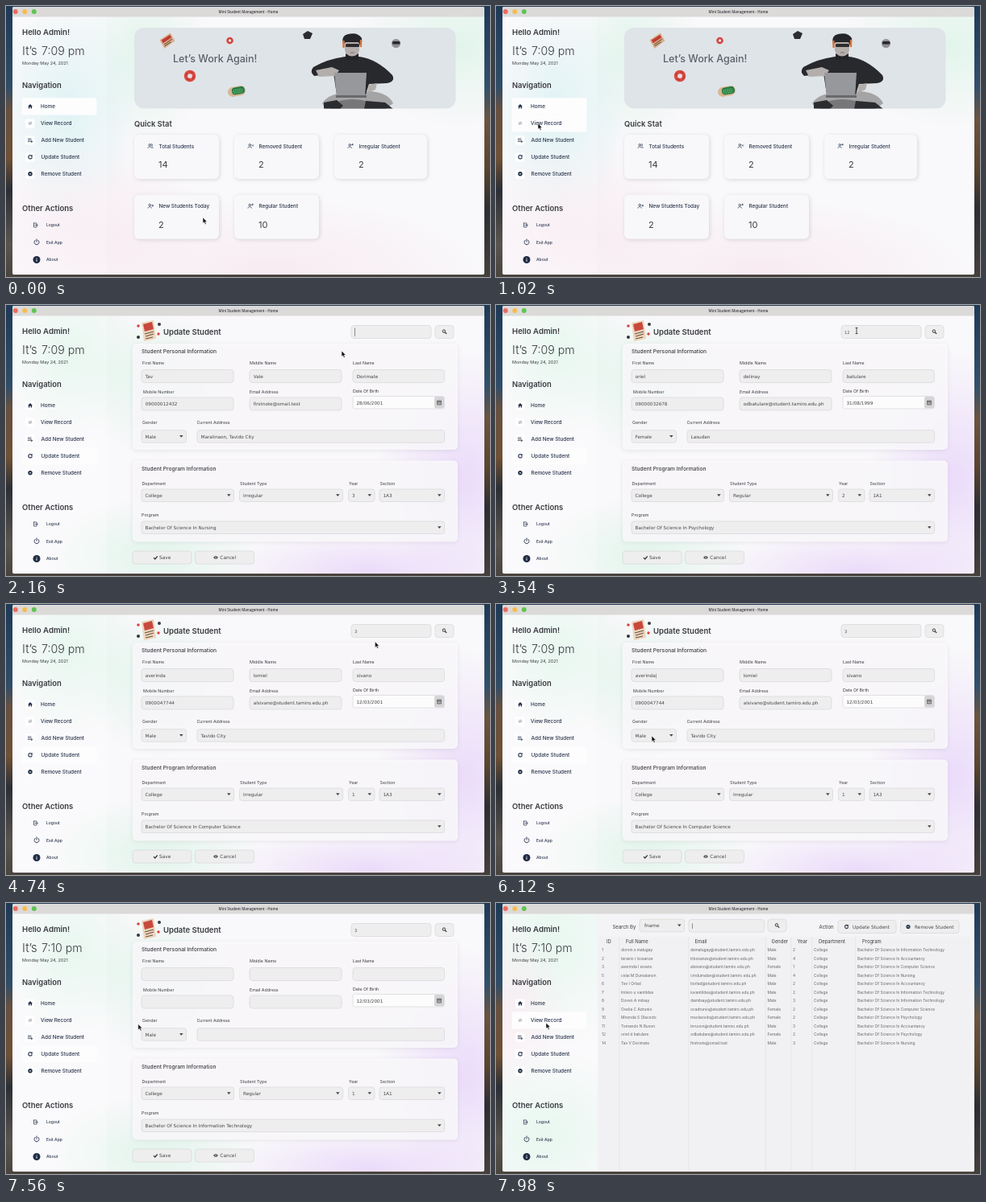
An HTML page that plays this animation: 600x337 px, repeating every 8000 ms.

```html
<!DOCTYPE html>
<html lang="en">
<head>
<meta charset="utf-8">
<title>Mini Student Management</title>
<style>
html,body{margin:0;width:100%;height:100%;overflow:hidden;background:#18202c}
svg{display:block;width:100%;height:100%}
text{font-family:Inter,sans-serif;fill:#3a3b41;white-space:pre}
.ui{font-family:"DejaVu Sans",sans-serif;fill:#46464a}
.head{font-weight:600}
.nav{font-weight:500;fill:#2a354c}
.field{fill:#efeeef;stroke:#d2d1d4;stroke-width:.6}
.lit{fill:#fcfcfc}
.panel{fill:#fbfafc;fill-opacity:.86;filter:drop-shadow(0 1.5px 2.5px #3432441c)}
.card{fill:#f8f8fa;filter:drop-shadow(1px 1.5px 2.5px #3432442a)}
.ico{fill:#1f2c45}
.line{fill:none;stroke:#26334b;stroke-width:.8;stroke-linecap:round}
.cell{fill:#66656b}
</style>
</head>
<body>
<script>
const LOOP = 8000;

const text = (x, y, s, size, cls = '', extra = '') =>
  `<text x="${x}" y="${y}" font-size="${size}" class="${cls}" ${extra}>${s}</text>`;
const box = (x, y, w, h, r, cls = '', extra = '') =>
  `<rect x="${x}" y="${y}" width="${w}" height="${h}" rx="${r}" class="${cls}" ${extra}/>`;
const dot = (x, y, r, fill, extra = '') => `<circle cx="${x}" cy="${y}" r="${r}" fill="${fill}" ${extra}/>`;
const path = (d, extra) => `<path d="${d}" ${extra}/>`;
const at = (x, y, body, more = '') => `<g transform="translate(${x} ${y}) ${more}">${body}</g>`;
const group = (id, body) => `<g id="${id}">${body}</g>`;
const gradient = (id, stops, dir = 'x2="0" y2="1"') => `<linearGradient id="${id}" ${dir}>` +
  stops.map(([o, c]) => `<stop offset="${o}" stop-color="${c}"/>`).join('') + '</linearGradient>';
const glow = (id, color, opacity) => `<radialGradient id="${id}">
  <stop stop-color="${color}" stop-opacity="${opacity}"/><stop offset="1" stop-color="${color}" stop-opacity="0"/></radialGradient>`;
const blob = (x, y, rx, ry, id) => `<ellipse cx="${x}" cy="${y}" rx="${rx}" ry="${ry}" fill="url(#${id})"/>`;

const defs = `<defs>
  ${gradient('leftEdge', [[0, '#1e3a56'], [.3, '#304d68'], [.38, '#665040'], [.56, '#6f5135'], [.68, '#2b2f36'], [.88, '#5a544e'], [1, '#4a443f']])}
  ${gradient('rightEdge', [[0, '#1e3a56'], [.3, '#33506a'], [.42, '#6b543f'], [.6, '#59442f'], [.75, '#2c2e33'], [1, '#45403c']])}
  ${glow('mint', '#d2f3e2', .6)}${glow('cyan', '#d3eef0', .85)}${glow('pink', '#f7e2ec', .6)}${glow('lilac', '#e6d2fa', .75)}
  <pattern id="hatch" width="1.4" height="1.4" patternUnits="userSpaceOnUse">
    <rect width="1.4" height="1.4" fill="#d6e6f0"/><rect width=".7" height=".7" fill="#6ca3c8"/><rect x=".7" y=".7" width=".7" height=".7" fill="#8bb8d4"/>
  </pattern>
  <clipPath id="window"><rect x="8" y="1" width="585" height="333" rx="2"/></clipPath>
  <clipPath id="hero"><rect x="159" y="27" width="398.5" height="100.5" rx="12"/></clipPath>
</defs>`;

// Icons are centred on the origin.
const magnifier = at(0, 0, `<circle cx="-.6" cy="-.6" r="1.7" fill="none" stroke="#333" stroke-width="1"/>` +
  path('M.8.8 2.7 2.7', 'stroke="#333" stroke-width="1.2"'));
const refresh = path('M2-1.7A2.5 2.5 0 1 0 2.4 1', 'class="line" style="stroke-width:1.3"') + path('M3-3V-.2H.3Z', 'class="ico"');
const remove = dot(0, 0, 3, '#1f2c45') + path('M-1-1 1 1M1-1-1 1', 'stroke="#fff" stroke-width=".8"');
const navIcons = [
  path('M-3.2.2 0-3 3.2.2H2.3V3H.8V.8H-.8V3H-2.3V.2Z', 'class="ico"'),
  path('M-2-.9H2L.9-2M2 .9H-2L-.9 2', 'class="line" style="stroke:#77808f;stroke-width:.7"'),
  path('M-3-2H1.2M-3 0H1.2M-3 2H-.6M.6 2H3.2M1.9.7V3.3', 'class="line"'),
  refresh, remove
];
const person = mark => `<circle cx="-1" cy="-1.4" r="1.5" class="line"/>` +
  path('M-3.7 3C-3.7.4 1.7.4 1.7 3' + mark, 'class="line"');
const plus = 'M2.2-.6H4.4M3.3-1.7V.5';
const cross = 'M2.4-1.5 4.2.3M4.2-1.5 2.4.3';
const pair = 'M1.6-2.9A1.5 1.5 0 0 1 1.6.1M2.6 1Q3.8 1.6 3.8 3';
const star = 'M3-3V-1M2-2H4';

const gadget = path('M-8-3 7-8 10 3-5 9Z', 'fill="#d7b08b"') + path('M-6-2 6-6 7-2-5 2Z', 'fill="#c33b30"') +
  path('M-4 4 7 0M-4 6 5 3', 'stroke="#6d4939" stroke-width="1"');
const ring = dot(0, 0, 4.6, 'none', 'stroke="#dc4a42" stroke-width="4"') + dot(0, 0, 4.6, 'none', 'stroke="#b9302b" stroke-width="1" stroke-dasharray="4 3"');

const figure = `
  ${path('M392 121Q400 108 424 108L452 106Q474 108 480 121L470 128H396Z', 'fill="#a5a4a5"')}
  ${path('M404 122Q430 108 470 126L472 128H402Z', 'fill="#77777a"')}
  ${path('M394 120 410 117 418 124 414 128H394ZM446 118 470 120 480 128H444Z', 'fill="#2b2c30"')}
  ${path('M420 63Q398 66 381 76 376 82 382 87L406 84 410 110H446L450 97 472 96Q483 94 479 86 460 66 438 63Z', 'fill="#28292d"')}
  ${path('M384 80 404 76 413 80 408 87 388 88Z', 'fill="#b3aeac"')}
  ${path('M450 98 460 96 458 104 448 108Z', 'fill="#b3aeac"')}
  ${path('M420 44H438V55Q436 63 429 63 422 63 420 55Z', 'fill="#b5aeab"')}
  ${path('M421 59Q429 66 437 59V67H421Z', 'fill="#222327"')}
  ${path('M418 48Q415 37 424 35 436 32 441 40 442 46 439 49L437 45H421Z', 'fill="#25262a"')}
  ${path('M418.5 44V51M440 43V50', 'stroke="#d9743c" stroke-width="2.4" stroke-linecap="round"')}
  ${box(421, 47, 17, 4, 1.5, '', 'fill="#2b2c30"')}
  ${path('M427 58H432', 'stroke="#6a6362" stroke-width=".8"')}
  ${path('M407 83H447L445 113H410Z', 'fill="#97989b"')}${path('M409 111H447V114H409Z', 'fill="#68696d"')}`;

const stats = [['Total Students', 14, pair], ['Removed Student', 2, cross], ['Irregular Student', 2, star],
  ['New Students Today', 2, plus], ['Regular Student', 10, star]];
const homePage = blob(560, 50, 130, 100, 'mint') + blob(170, 60, 80, 110, 'mint') + blob(75, 130, 90, 150, 'cyan') + blob(100, 280, 150, 110, 'pink') + blob(330, 330, 260, 90, 'pink') +
  box(159, 27, 398.5, 100.5, 12, '', 'fill="#dfe4e8"') +
  `<g clip-path="url(#hero)">${figure}</g>` +
  at(199, 43, gadget, 'rotate(-15)') + at(277.5, 43, ring, 'scale(.65)') + at(228, 87, ring, 'scale(1.1)') +
  at(286, 106, box(-11, -6, 22, 12, 6, '', 'fill="#d9b694"') + box(-6, -5, 16, 9, 4, '', 'fill="#277a42"') +
    path('M-4-2H7M-5 0H8M-4 2H7', 'stroke="#7ed28c" stroke-width=".9" stroke-dasharray="1.5 1"'), 'rotate(-10)') +
  path('M368 35 374 31 380 34 377 41 370 41Z', 'fill="#2b2d30"') +
  dot(483.5, 46.5, 5.5, '#8e9093') + box(479, 44, 9.5, 3.6, 1.5, '', 'fill="#26282b"') +
  text(207, 70, 'Let’s Work Again!', 12.5, '', 'style="fill:#5a6067;font-weight:500"') +
  text(159, 150.3, 'Quick Stat', 9.4, 'head') +
  stats.map(([label, value, mark], i) => at(159 + i % 3 * 124, 160 + (i > 2) * 74.7,
    box(0, 0, i === 2 ? 115 : 105, 55, 6, 'card') + at(20, 14, person(mark), 'scale(.85)') + text(30.5, 16.5, label, 6.35, 'nav') + text(30, 41.2, value, 11))).join('');

const combo = (id, x, y, w) => box(x, y, w, 15.5, 3, 'field') + text(x + 4.5, y + 10, '', 5.7, 'ui', `id="${id}"`) +
  path(`M${x + w - 8.5} ${y + 6.2}h4.6l-2.3 2.8Z`, 'fill="#444"');
const input = (id, x, y, w) => box(x, y, w, 16, 3.5, 'field') + text(x + 4.7, y + 10.3, '', 5.7, 'ui', `id="${id}"`);
const label = (x, y, s) => text(x, y, s, 5.3);
const button = (x, y, w, s, tx, icon, id = '') => box(x, y, w, 16, 3.5, 'field', id && `id="${id}"`) +
  icon + text(tx, y + 10.2, s, 5.85, 'ui');

const updatePage = blob(185, 310, 130, 70, 'mint') + blob(190, 100, 90, 90, 'mint') + blob(570, 215, 110, 160, 'lilac') + blob(80, 60, 90, 100, 'mint') + blob(450, 330, 180, 50, 'lilac') +
  at(176, 32, path('M-8-10 7-13 10 10-5 13Z', 'fill="#ecd6bd"') + path('M-6-8 5-11 7-2-4 1Z', 'fill="#c8493c"') +
    path('M-4 4 7 1M-3 7 7 4M-3 10 6 8', 'stroke="#6d5144" stroke-width="1.1"') + dot(-12, -6, 1.8, '#d8453e') + dot(14, -8, 2, '#3a3c40') +
    dot(-12, 8, 2, '#333539') + dot(13, 4, 1.7, '#d8453e')) +
  text(195, 37, 'Update Student', 9.5, 'head') +
  box(428, 25.5, 99, 16, 3.5, 'field') + text(432, 35.6, '', 5, 'ui', 'id="query"') +
  path('M432.5 28.5V39', 'id="caret" stroke="#444" stroke-width=".6"') +
  box(532, 25.5, 23, 16, 3.5, 'field') + at(543.5, 33.2, magnifier) +
  box(157, 48, 403, 132, 5, 'panel') + text(168, 60, 'Student Personal Information', 6.7, '', 'font-weight="500"') +
  label(169, 74, 'First Name') + label(302, 74, 'Middle Name') + label(430, 74, 'Last Name') +
  input('first', 168, 80.5, 114) + input('middle', 302, 80.5, 114) + input('last', 430, 80.5, 113.5) +
  label(170, 109.7, 'Mobile Number') + label(302, 109.7, 'Email Address') + label(430, 108.7, 'Date Of Birth') +
  input('phone', 168, 115, 114) + input('email', 302, 115, 114) +
  box(430, 113.5, 113.5, 15.5, 2.5, 'field lit') + text(434.5, 123.8, '', 5.7, 'ui', 'id="birth"') +
  box(531, 114, 12, 14.5, 2, '', 'fill="#d5d4d6"') + path('M534.5 119H539.5V124H534.5ZM534.5 120.5H539.5M536 119V124M538 119V124', 'fill="none" stroke="#555" stroke-width=".7"') +
  label(169, 148, 'Gender') + label(236.5, 148, 'Current Address') +
  combo('gender', 168, 155.7, 55.5) + box(237, 155.7, 306.5, 15.5, 3, 'field') + text(241.5, 165.7, '', 5.7, 'ui', 'id="address"') +
  box(157, 193.5, 403, 101, 5, 'panel') + text(168, 205.5, 'Student Program Information', 6.7, '', 'font-weight="500"') +
  label(168.5, 223.5, 'Department') + label(290, 223.5, 'Student Type') + label(425, 223.5, 'Year') + label(463.5, 223.5, 'Section') +
  combo('department', 168, 229, 114.5) + combo('type', 289.5, 229, 128) + combo('year', 424.5, 229, 32.5) + combo('section', 463, 229, 80.5) +
  label(168, 263, 'Program') + combo('program', 168, 269, 375.5) +
  button(157, 306, 73, 'Save', 190, path('M183 314.2 184.7 316 187.7 312.5', 'fill="none" stroke="#333" stroke-width="1.2"'), 'save') +
  button(234.5, 306, 73, 'Cancel', 265.3, at(260, 314, `<ellipse rx="2.7" ry="1.8" fill="#444"/>` + path('M-1.2 0H1.2', 'stroke="#fff" stroke-width=".8"'))) +
  group('popup', box(168, 171.5, 56, 26.5, 1.5, '', 'fill="#f7f7f7" stroke="#aaa" stroke-width=".5"') +
    box(168.4, 172, 55.2, 12.8, 1, '', 'fill="#39698a"') + text(172.5, 180.5, 'Male', 5.7, 'ui', 'style="fill:#fff"') + text(172.5, 193.3, 'Female', 5.7, 'ui')) +
  group('dialog', box(221, 86.7, 158, 77.3, 1.5, '', 'fill="#efefef" stroke="#a9a8aa" stroke-width=".6" style="filter:drop-shadow(0 2px 4px #0006)"') +
    path('M221 96V88.2Q221 86.7 222.5 86.7H377.5Q379 86.7 379 88.2V96Z', 'fill="#d6d4d4"') + dot(225, 91.4, 2.8, '#bbb9ba') +
    text(300, 93, 'Notification', 4, 'ui', 'text-anchor="middle"') +
    text(225.7, 115, 'Successfuly Updated', 6.45, 'ui') +
    dot(363.7, 112.7, 7.6, '#336491', 'stroke="#8cb0cb" stroke-width="1"') + text(363.7, 116, 'i', 9.5, 'ui', 'text-anchor="middle" style="fill:#fff;font-weight:700"') +
    path('M221.5 129.5H378.5', 'stroke="#d2d1d2" stroke-width=".6"') +
    text(225.7, 141.3, 'Student Information Updated Successfully', 5.5, 'ui') +
    box(336.7, 147.5, 37.6, 11.3, 2, '', 'fill="url(#hatch)" stroke="#3f82ae" stroke-width="1"') +
    text(355.5, 155.3, 'OK', 5.8, 'ui', 'text-anchor="middle"'));

const IT = 'Information Technology', CS = 'Computer Science';
const rows = [
  [1, 'dorvin s malugay', 'dsmalugay', 'Male', 2, IT], [2, 'teravio r bosanze', 'trbosanze', 'Male', 4, 'Accountancy'],
  [3, 'averinda l sivano', 'alsivano', 'Female', 1, CS], [5, 'celai M Dumalanon', 'cmdumalan', 'Male', 4, 'Nursing'],
  [6, 'Tev I Orlad', 'tiorlad', 'Male', 2, 'Accountancy'], [7, 'Imlero u vantildes', 'iuvantildes', 'Male', 2, IT],
  [8, 'Doven A milsay', 'damilsay', 'Male', 3, IT], [9, 'Ovelia C Adrunio', 'ocadrunio', 'Female', 2, CS],
  [10, 'Mirenda S Olacedo', 'msolacedo', 'Female', 2, 'Psychology'], [11, 'Tomando N Ruvon', 'tnruvon', 'Male', 3, 'Accountancy'],
  [12, 'oriel d batulare', 'odbatulare', 'Female', 2, 'Psychology'], [14, 'Tav V Dorimate', 'firstnote@omail.test', 'Male', 3, 'Nursing']
];
const school = name => name.includes('@') ? name : name + '@student.tamiro.edu.ph';
const degree = field => 'Bachelor Of Science In ' + field;
const columns = [131, 155, 241, 336.5, 368, 394, 448];
const heads = [['ID', 137], ['Full Name', 161], ['Email', 246.5], ['Gender', 341.5], ['Year', 373.5], ['Department', 400], ['Program', 454]];
const tablePage = blob(70, 50, 120, 130, 'mint') + blob(20, 130, 70, 110, 'pink') + blob(60, 290, 120, 110, 'mint') +
  box(126, 13, 467, 321, 0, '', 'fill="#f4f3f5"') + box(127, 42, 461, 291, 0, '', 'fill="#f1f0f2"') +
  text(144.5, 31.5, 'Search By', 6) + combo('', 178, 20.3, 55.5) + text(184, 30.3, 'fname', 5.8, 'ui') +
  box(239, 20.5, 93.5, 15.5, 3, 'field') + path('M243.5 25.5V32', 'stroke="#444" stroke-width=".6"') +
  box(337, 20.3, 23, 15.5, 3.5, 'field') + at(348.5, 28, magnifier) + text(400.5, 31.5, 'Action', 6) +
  button(424, 21.5, 72, 'Update Student', 442, at(434.5, 29.5, refresh, 'scale(.85)')) +
  button(501.5, 21.5, 72.5, 'Remove Student', 519, at(511, 29.5, remove, 'scale(.85)')) +
  columns.slice(1).map(x => path(`M${x - 2.3} 42V333`, 'stroke="#e2e1e5" stroke-width=".6"')).join('') +
  heads.map(([s, x]) => text(x, 49.7, s, 5.9)).join('') +
  rows.map(([id, name, mail, gender, year, field], i) =>
    [id, name, school(mail), gender, year, 'College', degree(field)].map((s, c) => text(columns[c], 60 + i * 10.52, s, 4.85, 'cell')).join('')).join('');

const navNames = ['Home', 'View Record', 'Add New Student', 'Update Student', 'Remove Student'];
const sidebar = box(8, 13, 117, 321, 0, '', 'fill="#fff" fill-opacity=".18"') +
  text(20, 36.3, 'Hello Admin!', 9.6, 'head') +
  text(20, 61, 'It’s', 14.8, '', 'font-weight="300"') + text(44, 61, '', 14.2, '', 'id="clock" font-weight="300"') +
  text(20, 72.7, 'Monday May 24, 2021', 5.45) + text(20, 102.4, 'Navigation', 9.4, 'head') +
  navNames.map((s, i) => {
    const y = 124.8 + i * 21;
    return box(24, y - 5.5, 11.5, 11.5, 2, '', 'fill="#fff" fill-opacity=".85"') + box(19.8, y - 10.6, 92.5, 21.2, 2, 'active', 'fill="#fdfdfe"') +
      at(30, y, navIcons[i], 'scale(.9)') + text(i > 1 ? 43.6 : 43, y + 2.2, s, 6.4, 'nav');
  }).join('') +
  text(20, 255.3, 'Other Actions', 9.5, 'head') +
  at(36.5, 272.5, path('M-2-2.5H1.5V-1.3M1.5 1.3V2.5H-2V-2.5M-.5 0H2.6M1.6-1 2.6 0 1.6 1', 'class="line" style="stroke-width:.7"')) +
  at(38, 293.5, path('M-1.8-2.2A3 3 0 1 0 1.8-2.2M0-3.6V-.2', 'class="line" style="stroke-width:.9"')) +
  at(38, 315.5, dot(0, 0, 4.5, '#1f2c45') + path('M0-2V-1M0-.2V2.2', 'stroke="#fff" stroke-width="1"')) +
  text(50, 274.3, 'Logout', 5, 'nav') + text(50, 295.6, 'Exit App', 5, 'nav') + text(50, 317.4, 'About', 5, 'nav');

const titleBar = box(8, 1, 585, 12.5, 0, '', 'fill="#dcdad9"') +
  ['#ee6a5f', '#f5bd4f', '#61c454'].map((c, i) => dot(11.8 + i * 11.5, 7, 3, c)).join('') +
  text(300.4, 9, 'Mini Student Management - Home', 4.45, '', 'text-anchor="middle" style="font-family:\'Open Sans\',sans-serif;font-weight:600"');

document.body.innerHTML = `<svg viewBox="0 0 600 337" preserveAspectRatio="none">${defs}
  <rect width="600" height="337" fill="#4a443f"/><rect width="600" height="2" fill="#243c55"/>
  <rect width="9" height="337" fill="url(#leftEdge)"/><rect x="591" width="9" height="337" fill="url(#rightEdge)"/>
  <g clip-path="url(#window)">${box(8, 1, 585, 333, 0, '', 'fill="#f9f8fa"')}
  ${group('home', homePage)}${group('update', updatePage)}${group('table', tablePage)}${sidebar}${titleBar}</g>
  <g id="cursor">${path('M0 0V7.3L1.7 5.8 2.9 8.5 4.2 7.9 3 5.3H5.3Z', 'id="arrow" fill="#161616" stroke="#fff" stroke-width=".5"')}
  ${path('M-1.4-3.6H1.4M0-3.6V3.6M-1.4 3.6H1.4', 'id="beam" stroke="#222" stroke-width=".8" fill="none"')}</g></svg>`;

const $ = id => document.getElementById(id);
const fieldIds = ['query', 'first', 'middle', 'last', 'phone', 'email', 'birth', 'gender', 'address', 'department', 'type', 'year', 'section', 'program', 'clock'];
const record = (first, middle, last, phone, mail, birth, gender, address, type, year, section, field) =>
  ({first, middle, last, phone, email: school(mail), birth, gender, address, department: 'College', type, year, section, program: degree(field)});
const nursing = record('Tav', 'Vale', 'Dorimate', '09000012432', 'firstnote@omail.test', '28/06/2001', 'Male', 'Maralinaon, Tavido City', 'Irregular', 3, '1A3', 'Nursing');
const psychology = record('oriel', 'delinay', 'batulare', '09000032678', 'odbatulare', '31/08/1999', 'Female', 'Lasudan', 'Regular', 2, '1A1', 'Psychology');
const computing = record('averinda', 'lomiel', 'sivano', '0900047744', 'alsivano', '12/03/2001', 'Male', 'Tavido City', 'Irregular', 1, '1A3', CS);
const blank = {first: '', middle: '', last: '', phone: '', email: '', address: ''};

const events = [
  [0, {page: 'home', nav: [0], clock: '7:09 pm', query: '', ...nursing}],
  [900, {nav: [0, 1]}],
  [1200, {nav: [0, 3]}],
  [1380, {page: 'update', nav: [3]}],
  [1800, {caret: true}],
  [2460, {beam: true}],
  [2700, {query: '1', caret: false}],
  [2820, {query: '12'}],
  [3060, {beam: false}],
  [3240, psychology],
  [3420, {beam: true}],
  [3660, {query: '', caret: true}],
  [3780, {query: '3', caret: false}],
  [3900, {beam: false}],
  [4080, computing],
  [5400, {beam: true}],
  [5520, {first: 'averinda|'}],
  [5820, {beam: false}],
  [6180, {popup: true}],
  [6480, {popup: false, first: 'averinda'}],
  [6600, {type: 'Regular'}],
  [6720, {section: '1A1'}],
  [6840, {program: degree(IT)}],
  [6960, {save: true}],
  [7020, {dialog: true, ...blank}],
  [7260, {save: false}],
  [7380, {dialog: false}],
  [7560, {clock: '7:10 pm'}],
  [7680, {nav: [1, 3]}],
  [7740, {page: 'table', nav: [1]}]
];

// time, x, y
const track = [[0, 244, 263], [180, 244, 263], [900, 52, 146], [1080, 52, 146], [1260, 66, 187], [1500, 66, 187], [2160, 416, 57],
  [2520, 443, 33], [2940, 447, 32], [3160, 543, 33], [3260, 543, 33], [3480, 447, 32], [3780, 447, 32], [4020, 541, 33], [4260, 541, 33],
  [5080, 408, 55], [5460, 196, 89], [5700, 196, 89], [6090, 193, 164], [6200, 193, 164], [6360, 193, 177], [6480, 193, 177],
  [6600, 350, 238], [6720, 495, 238], [6840, 300, 278], [6960, 200, 312], [7060, 200, 312], [7140, 233, 285], [7280, 355, 153],
  [7380, 355, 153], [7680, 62, 149], [LOOP, 62, 149]];

const show = (id, on) => { $(id).style.display = on ? '' : 'none'; };
const actives = document.querySelectorAll('.active');
let shown = -1;

function applyState(count) {
  const state = Object.assign({}, ...events.slice(0, count).map(e => e[1]));
  for (const page of ['home', 'update', 'table']) show(page, page === state.page);
  for (const id of ['caret', 'popup', 'dialog', 'beam']) show(id, state[id]);
  show('arrow', !state.beam);
  for (const id of fieldIds) $(id).textContent = state[id];
  actives.forEach((el, i) => { el.style.display = state.nav.includes(i) ? '' : 'none'; });
  $('save').classList.toggle('lit', !!state.save);
}

function draw(now) {
  const t = now % LOOP;
  const count = events.filter(e => e[0] <= t).length;
  if (count !== shown) applyState(shown = count);
  const i = track.findIndex(p => p[0] > t);
  const [t0, x0, y0] = track[i - 1], [t1, x1, y1] = track[i];
  const u = (t - t0) / (t1 - t0), ease = u * u * (3 - 2 * u);
  $('cursor').setAttribute('transform', `translate(${x0 + (x1 - x0) * ease} ${y0 + (y1 - y0) * ease})`);
}

const start = performance.now();
function tick() {
  draw(performance.now() - start);
  requestAnimationFrame(tick);
}
tick();
</script>
</body>
</html>
```
